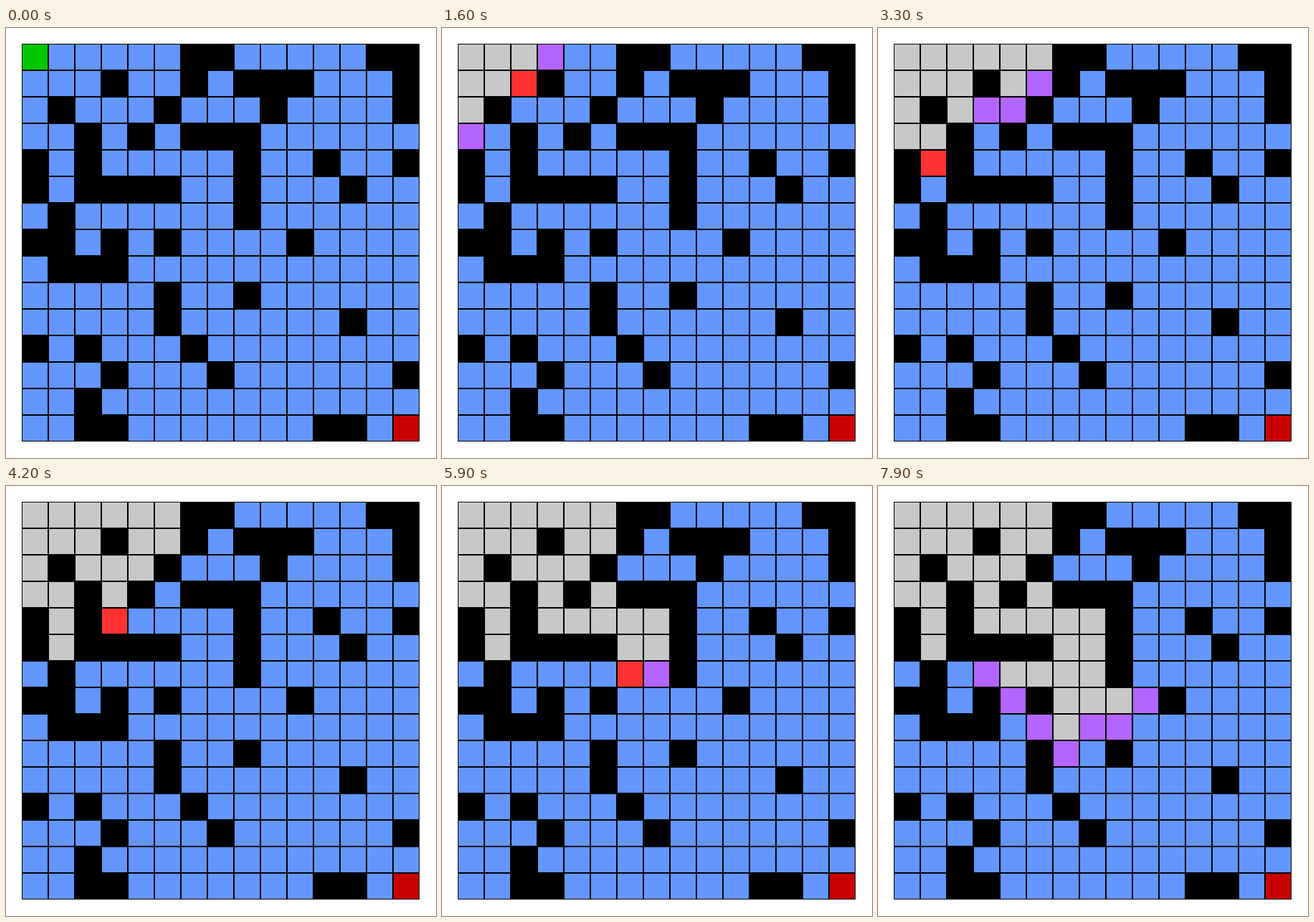
A matplotlib script for the animation above (8 s loop, 600x600 px).

```python
import matplotlib.pyplot as plt
from matplotlib.animation import FuncAnimation
from matplotlib.patches import Rectangle

SIZE, ORIGIN, PITCH = 600, 22, 37
FRAMES, INTERVAL = 80, 100

FREE, QUEUED, CURRENT, DONE = "#6496ff", "#b464ff", "#ff3232", "#c8c8c8"
START_COLOR, GOAL_COLOR = "#00c800", "#c80000"

MAZE = """
......##.....##
...#..#.###...#
.#...#...#....#
..#.#.###......
#.#.....#..#..#
#.####..#...#..
.#......#......
##.#.#....#....
.###...........
.....#..#......
.....#......#..
#.#...#........
...#...#......#
..#............
..##.......##..
""".split()
N = len(MAZE)
START, GOAL = (0, 0), (N - 1, N - 1)
STEPS = [(0, 1), (0, -1), (1, 0), (-1, 0)]  # right, left, down, up
OPEN = [(r, c) for r in range(N) for c in range(N) if MAZE[r][c] == "."]


def rise(heap, pos):
    """Move an item towards the root while it is strictly closer."""
    item = heap[pos]
    while pos and item[0] < heap[(pos - 1) // 2][0]:
        heap[pos] = heap[(pos - 1) // 2]
        pos = (pos - 1) // 2
    heap[pos] = item


def push(heap, item):
    heap.append(item)
    rise(heap, len(heap) - 1)


def pop(heap):
    """Binary heap pop; ties between children go to the right one."""
    last = heap.pop()
    if not heap:
        return last
    top, pos, child = heap[0], 0, 1
    while child < len(heap):
        right = child + 1
        if right < len(heap) and heap[right][0] <= heap[child][0]:
            child = right
        heap[pos] = heap[child]
        pos, child = child, 2 * child + 1
    heap[pos] = last
    rise(heap, pos)
    return top


def search():
    """Dijkstra from START, yielding one (cell, color) event per step."""
    free, seen, heap = set(OPEN), {START}, [(0, START)]
    yield START, QUEUED
    while heap:
        dist, (r, c) = pop(heap)
        yield (r, c), CURRENT
        if (r, c) == GOAL:
            return
        for dr, dc in STEPS:
            cell = r + dr, c + dc
            if cell in free and cell not in seen:
                seen.add(cell)
                push(heap, (dist + 1, cell))
                yield cell, QUEUED


EVENTS = list(search())

fig = plt.figure(figsize=(SIZE / 100, SIZE / 100), dpi=100, facecolor="white")
ax = fig.add_axes([0, 0, 1, 1])
ax.set_xlim(0, SIZE)
ax.set_ylim(SIZE, 0)
ax.axis("off")


def add_square(x, y, size, color):
    return ax.add_patch(Rectangle((x, y), size, size, facecolor=color, linewidth=0))


add_square(ORIGIN, ORIGIN, N * PITCH, "black")
tiles = {
    (r, c): add_square(ORIGIN + 1 + PITCH * c, ORIGIN + 1 + PITCH * r, PITCH - 2, FREE)
    for r, c in OPEN
}


def update(step):
    colors = dict.fromkeys(OPEN, FREE)
    colors[START], colors[GOAL] = START_COLOR, GOAL_COLOR
    for i, (cell, color) in enumerate(EVENTS[:step], 1):
        # a visited cell is highlighted for a single step only
        colors[cell] = DONE if color == CURRENT and i < step else color
    for cell, tile in tiles.items():
        tile.set_facecolor(colors[cell])
    return list(tiles.values())


anim = FuncAnimation(fig, update, frames=FRAMES, interval=INTERVAL,
                     repeat=True, repeat_delay=0, blit=False)
plt.show()
```
